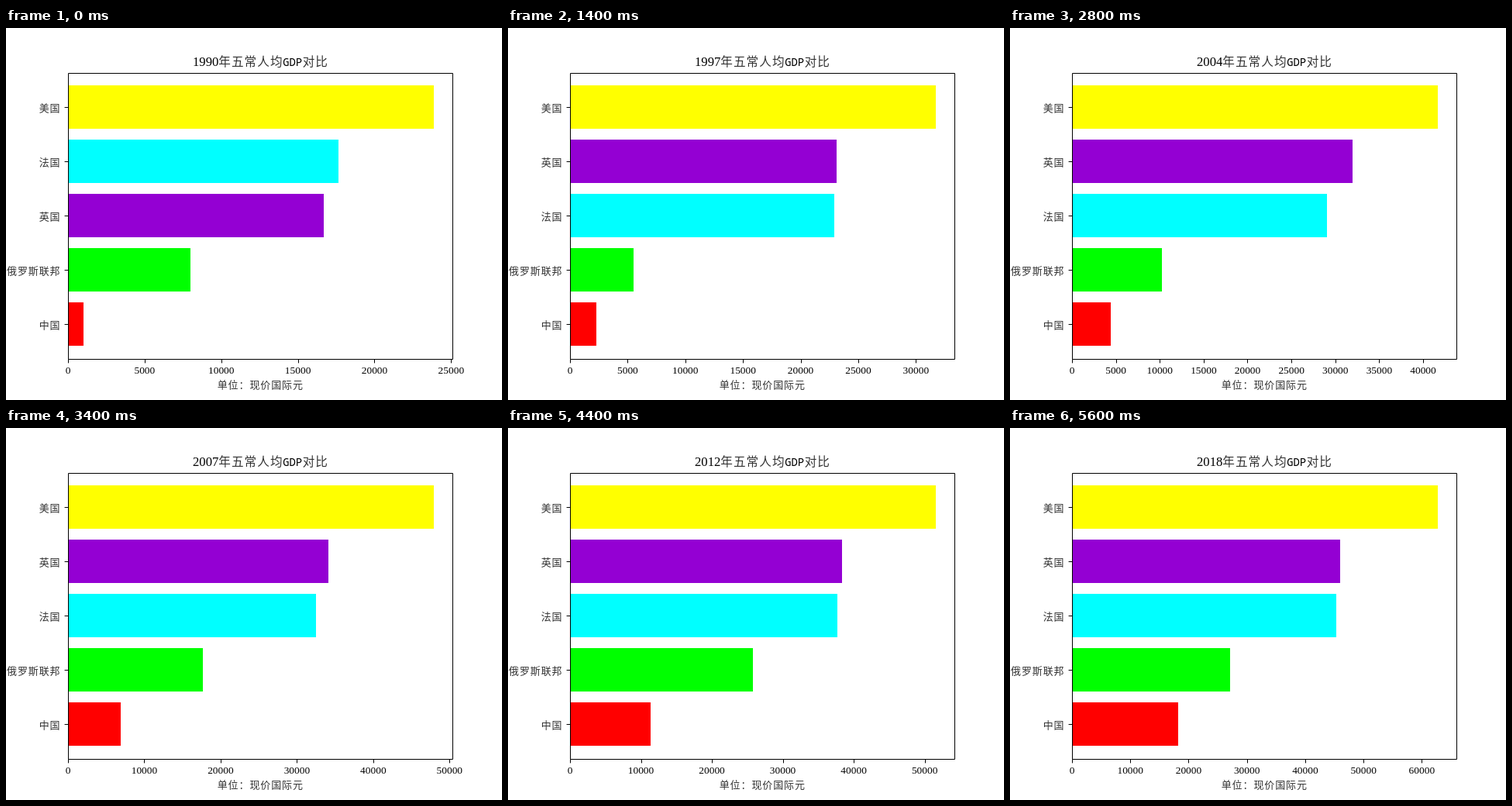
Recreate the animation shown at these times as an HTML page. Size 640 by 480 pixels, loop 5.8 s.

```html
<!DOCTYPE html>
<html lang="zh-CN">
<head>
<meta charset="utf-8">
<style>
html, body { margin: 0; width: 100%; height: 100%; overflow: hidden; background: #fff; }
svg { display: block; font: 13.4px "Liberation Serif", serif; }
.cjk { font: 300 13px "Noto Sans CJK SC", "Noto Sans CJK", sans-serif; letter-spacing: .89px; fill: #333; }
.title { font-size: 16.67px; }
.cjk.title { font-size: 15.6px; letter-spacing: 1.07px; }
.caps { font: 300 13.89px "Noto Sans Mono", monospace; }
.line { fill: none; stroke: #000; }
</style>
</head>
<body>
<svg id="chart" width="640" height="480" viewBox="0 0 640 480"></svg>
<script>
const START = 1990, YEARS = 29, STEP = 200;
const LEFT = 80, WIDTH = 496, BOTTOM = 427.5;

// GDP per head at turning points; straight growth in between
const countries = [
  { name: '美国', color: '#ff0', gdp: {
    1990: 23889, 1995: 28691, 2000: 36335, 2004: 41712, 2007: 47976,
    2009: 47100, 2010: 48468, 2012: 51611, 2018: 62795 } },
  { name: '法国', color: '#0ff', gdp: {
    1990: 17660, 1995: 20760, 2000: 26100, 2004: 29050, 2010: 35900,
    2011: 37441, 2012: 37679, 2018: 45342 } },
  { name: '英国', color: '#9400d3', gdp: {
    1990: 16680, 1995: 20530, 1996: 22000, 2000: 26400, 2004: 31970,
    2010: 36330, 2012: 38310, 2018: 45974 } },
  { name: '俄罗斯联邦', color: '#0f0', gdp: {
    1990: 8000, 1995: 5600, 1998: 5476, 2000: 6825, 2004: 10227,
    2008: 20164, 2010: 20498, 2012: 25773, 2018: 27147 } },
  { name: '中国', color: '#f00', gdp: {
    1990: 987, 1995: 1869, 2000: 2933, 2004: 4440, 2010: 9333,
    2012: 11351, 2018: 18237 } }
];

function gdpIn(points, year) {
  const keys = Object.keys(points).map(Number);
  const b = keys.find(k => k >= year);
  if (b === year) return points[b];
  const a = keys[keys.indexOf(b) - 1];
  return points[a] + (points[b] - points[a]) * (year - a) / (b - a);
}

const text = (x, y, str, cls = '', anchor = 'start') =>
  `<text x="${x}" y="${y}" class="${cls}" text-anchor="${anchor}">${str}</text>`;
const line = d => `<path class="line" d="${d}"/>`;

function draw(year) {
  const ranked = countries
    .map(({ name, color, gdp }) => ({ name, color, value: gdpIn(gdp, year) }))
    .sort((a, b) => b.value - a.value);
  const max = ranked[0].value * 1.05;
  const xAt = v => LEFT + v / max * WIDTH;
  const tick = max > 45000 ? 10000 : 5000;
  let out = '';

  ranked.forEach(({ name, color, value }, row) => {
    const y = 74 + row * 70;
    const w = Math.round(xAt(value)) - LEFT;
    out += `<rect x="${LEFT}" y="${y}" width="${w}" height="56" fill="${color}"/>`;
    out += line(`M75.6 ${y + 28.5}H80.5`);
    out += text(70.5, y + 33.5, name, 'cjk', 'end');
  });
  for (let v = 0; v <= max; v += tick) {
    out += line(`M${Math.round(xAt(v)) + .5} ${BOTTOM}v4.9`);
    out += text(xAt(v), 445.7, v, '', 'middle');
  }
  out += line(`M80.5 58.5H576.5V${BOTTOM}H80.5Z`);

  out += text(241, 49, year, 'title');
  out += text(274.3, 49, '年五常人均', 'cjk title');
  out += text(357.2, 49, 'GDP', 'caps');
  out += text(382.7, 49, '对比', 'cjk title');
  out += text(328.3, 465, '单位：现价国际元', 'cjk', 'middle');
  chart.innerHTML = out;
}

const chart = document.getElementById('chart');
let shown;
function loop() {
  const year = START + Math.floor(performance.now() / STEP) % YEARS;
  if (year !== shown) draw(shown = year);
  requestAnimationFrame(loop);
}
loop();
</script>
</body>
</html>
```
